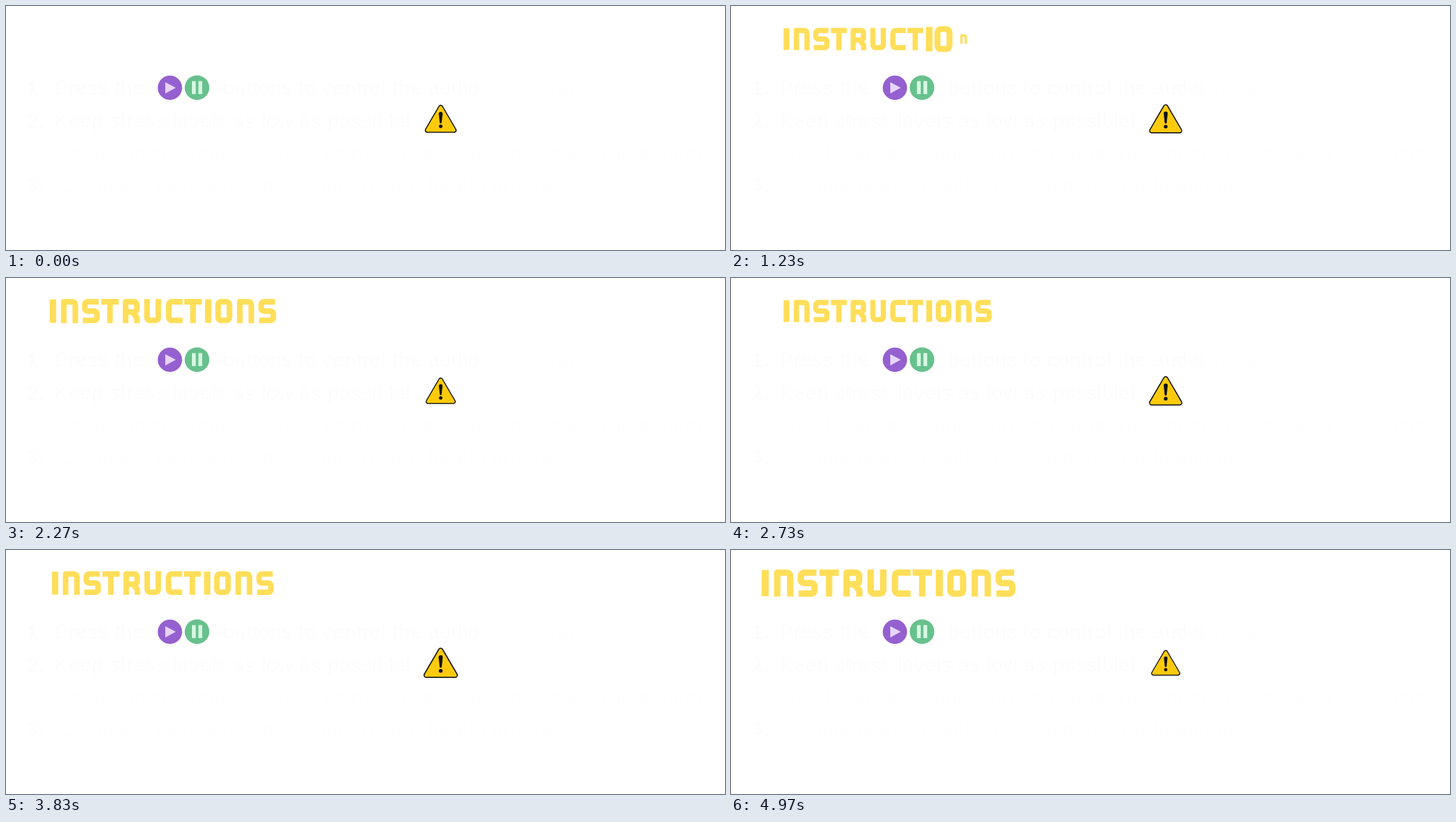
Write an HTML page with a canvas that moves like this. It is 1133x385 px and loops after 5.01 s.

```html
<!DOCTYPE html>
<html lang="en">
<head>
<meta charset="utf-8">
<title>Instructions</title>
<style>
html, body { margin: 0; width: 100%; height: 100%; overflow: hidden; background: #fff; }
canvas { display: block; }
</style>
</head>
<body>
<canvas id="stage" width="1133" height="385"></canvas>
<script>
const ctx = document.getElementById('stage').getContext('2d');
const LOOP = 5010, FRAME = 100 / 3, TAU = Math.PI * 2;

// Letter strokes in a box 35 units high
const GLYPHS = {
  I: 'M5 .5V34.5',
  N: 'M4.3 35V4H16Q21 4 21 9V35',
  S: 'M24 4H9Q4 4 4 8.5V13Q4 17.5 9 17.5H17Q21.5 17.5 21.5 22V26.5Q21.5 31 17 31H1',
  T: 'M0 4H25M12.5 4V35',
  R: 'M4.3 35V4H16Q20.5 4 20.5 8.5V14Q20.5 19 16 19H5M14 19L20.8 27V35',
  U: 'M4.3 0V26Q4.3 31 9 31H16Q20.7 31 20.7 26V0',
  C: 'M24.5 4H9Q4.3 4 4.3 9V26Q4.3 31 9 31H24.5',
  O: 'M9 4H16Q20.7 4 20.7 9V26Q20.7 31 16 31H9Q4.3 31 4.3 26V9Q4.3 4 9 4Z'
};
const SHAPES = {};
for (const k in GLYPHS) SHAPES[k] = new Path2D(GLYPHS[k]);

const WORD = 'INSTRUCTIONS';
const LEFTS = [82.5, 98.8, 129.6, 157.5, 188.3, 219.3, 250.8, 277.8, 307.3, 322.3, 353.8, 385];
const MID = { x: 246, y: 52.2 };

const NOTES = [
  [33, 140, '1.', '#fcfcfc', 'bold'],
  [77, 140, 'Press the', '#fcfcfc', ''],
  [342, 140, 'buttons to control the audio', '#fcfcfc', ''],
  [756, 140, 'voiceover', '#fefefe', ''],
  [33, 192, '2.', '#fcfcfc', 'bold'],
  [77, 192, 'Keep stress levels as low as possible!', '#fcfcfc', ''],
  [78, 243, 'Good choices reduce stress points while poor choices will raise them', '#fefefe', ''],
  [33, 293, '3.', '#fdfdfd', 'bold'],
  [84, 293, 'Complete each section to support your health progress!', '#fefefe', '']
];

function popScale(ms) {
  if (ms <= 0) return 0;
  const v = Math.min(ms / 390, 1) - 1;
  return 1 + 3.6 * v ** 3 + 2.6 * v ** 2;
}

// Slow decay from the peak, then a smooth swell back
function titleScale(t) {
  const p = (t + 1220) % 1500;
  const g = p < 1000 ? (1 - p / 1000) ** 2 : (1 - Math.cos(Math.PI * (p - 1000) / 500)) / 2;
  return 1 + g / 3;
}

function signWidth(t) {
  const p = ((t + 681) % 886) / 886;
  return 42 + 15 * Math.abs(1 - 2 * p);
}

function disc(x, y, r, color) {
  ctx.fillStyle = color;
  ctx.beginPath();
  ctx.arc(x, y, r, 0, TAU);
  ctx.fill();
}

function polygon(points) {
  ctx.beginPath();
  for (const [x, y] of points) ctx.lineTo(x, y);
  ctx.closePath();
}

function drawNotes() {
  ctx.letterSpacing = '1.1px';
  for (const [x, y, text, color, weight] of NOTES) {
    ctx.font = weight + ' 31px "Liberation Sans", sans-serif';
    ctx.fillStyle = color;
    ctx.fillText(text, x, y);
  }
}

function drawButtons() {
  disc(258.3, 129, 19.2, '#9560cf');
  ctx.fillStyle = '#e6d5fb';
  polygon([[251, 120.2], [267.5, 129], [251, 138]]);
  ctx.fill();
  disc(301, 128.8, 19.4, '#67c18c');
  ctx.fillStyle = '#d6f6e3';
  ctx.fillRect(293, 118.5, 6, 20.5);
  ctx.fillRect(303.2, 118.5, 6, 20.5);
}

function drawTitle(t) {
  const s = titleScale(t);
  ctx.save();
  ctx.translate(MID.x + 6 * (s - 1), MID.y);
  ctx.scale(s, s);
  ctx.strokeStyle = '#ffde59';
  ctx.lineJoin = 'round';
  [...WORD].forEach((ch, i) => {
    const k = popScale(t - 120 * i);
    if (k <= 0) return;
    const half = ch === 'I' ? 5 : 12.7;
    ctx.save();
    ctx.translate(LEFTS[i] + half - MID.x, 0);
    ctx.scale(k, k);
    ctx.translate(-half, -17.5);
    ctx.lineWidth = ch === 'I' ? 9.2 : 8.2;
    ctx.stroke(SHAPES[ch]);
    ctx.restore();
  });
  ctx.restore();
}

function drawSign(t) {
  const k = signWidth(t) / 50;
  ctx.save();
  ctx.translate(685, 178);
  ctx.scale(k, k);
  ctx.lineJoin = 'round';
  polygon([[0, -18], [21, 18], [-21, 18]]);
  ctx.strokeStyle = '#111';
  ctx.lineWidth = 8;
  ctx.stroke();
  ctx.strokeStyle = ctx.fillStyle = '#fdcb0b';
  ctx.lineWidth = 4.8;
  ctx.stroke();
  ctx.fill();
  ctx.fillStyle = '#111';
  ctx.beginPath();
  ctx.moveTo(-3, -8);
  ctx.quadraticCurveTo(-3, -11, 0, -11);
  ctx.quadraticCurveTo(3, -11, 3, -8);
  ctx.lineTo(1.5, 6.5);
  ctx.quadraticCurveTo(0, 8, -1.5, 6.5);
  ctx.fill();
  disc(0, 11.8, 2.8, '#111');
  ctx.restore();
}

function draw(now) {
  const t = Math.floor((now % LOOP + 4) / FRAME) * FRAME;
  ctx.fillStyle = '#fff';
  ctx.fillRect(0, 0, 1133, 385);
  drawNotes();
  drawButtons();
  drawTitle(t);
  drawSign(t);
}

let start;
function tick(now) {
  start ??= now;
  draw(now - start);
  requestAnimationFrame(tick);
}
draw(0);
requestAnimationFrame(tick);
</script>
</body>
</html>
```
